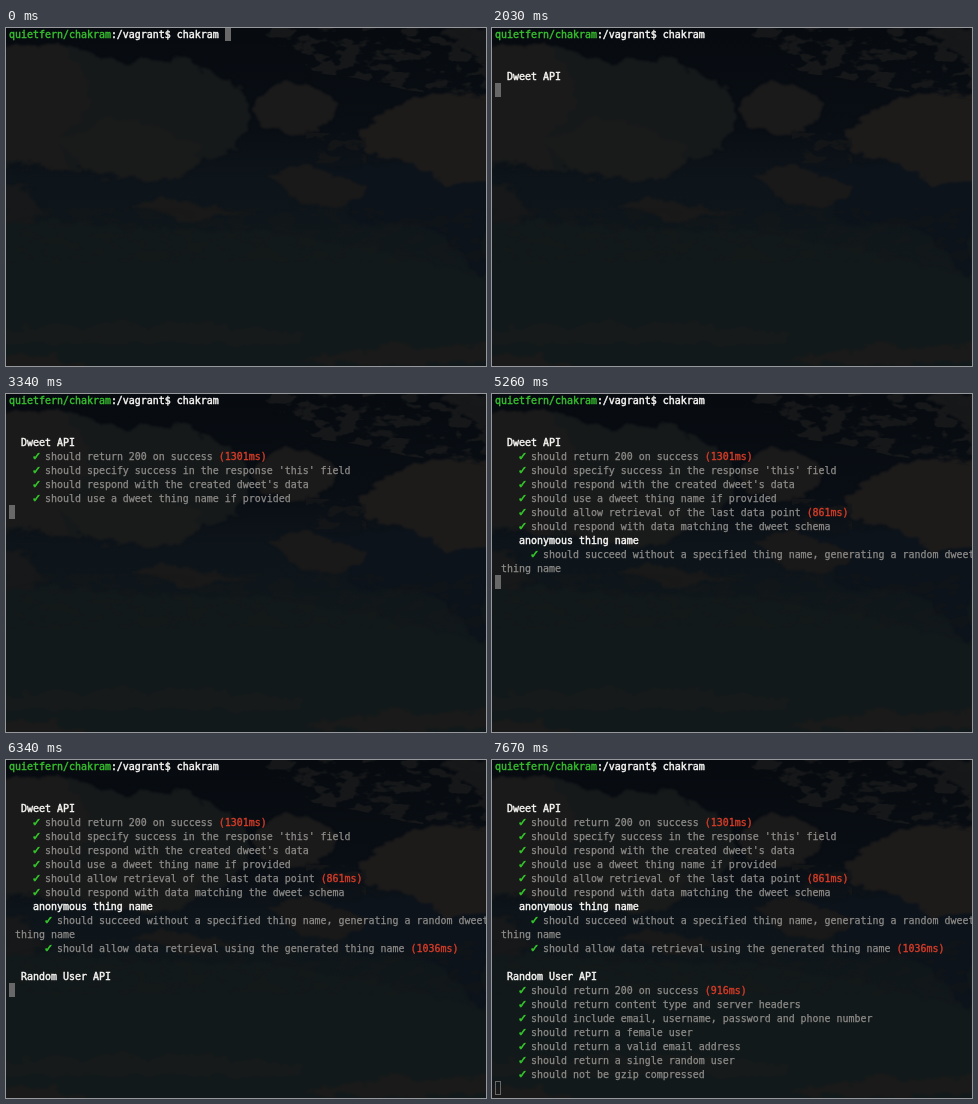
Recreate the animation shown at these times as an HTML page. Size 480x338 px, loop 7740 ms.

```html
<!DOCTYPE html>
<html lang="en">
<head>
<meta charset="utf-8">
<title>Test run in a terminal</title>
<style>
html, body { margin: 0; width: 100%; height: 100%; overflow: hidden; background: #10171b; }
svg, pre, #cursor { position: absolute; }
svg { left: 0; top: 0; }
pre {
  left: 3px; top: 0; margin: 0; color: #8e8c89;
  font: 9.967px/14px "DejaVu Sans Mono", monospace;
  -webkit-text-stroke: .25px;
}
pre div { height: 14px; }
.white { color: #f8f7f4; -webkit-text-stroke: .45px; }
.green { color: #37c22e; -webkit-text-stroke: .4px; }
.red { color: #d83c28; -webkit-text-stroke: .35px; }
.tick {
  position: absolute; margin-left: -1px; color: #35c92c;
  font: bold 11px/14px "DejaVu Sans", sans-serif; -webkit-text-stroke: .6px;
}
#cursor { box-sizing: border-box; width: 6px; height: 14px; border: 1px solid #686868; }
</style>
</head>
<body>
<svg width="480" height="338" viewBox="0 0 480 338">
  <defs>
    <linearGradient id="sky" x2="0" y2="1">
      <stop offset="0" stop-color="#070b10"/>
      <stop offset=".3" stop-color="#090e14"/>
      <stop offset=".45" stop-color="#0d141a"/>
      <stop offset=".62" stop-color="#10171b"/>
      <stop offset="1" stop-color="#14191b"/>
    </linearGradient>
    <filter id="rough" x="-20%" y="-20%" width="140%" height="140%" color-interpolation-filters="sRGB">
      <feTurbulence type="fractalNoise" baseFrequency=".045 .08" numOctaves="4" seed="4"/>
      <feDisplacementMap in="SourceGraphic" scale="18" xChannelSelector="R" yChannelSelector="G"/>
      <feGaussianBlur stdDeviation=".8"/>
    </filter>
    <filter id="flecks" color-interpolation-filters="sRGB">
      <feTurbulence type="fractalNoise" baseFrequency=".045 .09" numOctaves="3" seed="9"/>
      <feColorMatrix values="0 0 0 0 .085  0 0 0 0 .09  0 0 0 0 .095  10 0 0 0 -5"/>
      <feComposite in2="SourceGraphic" operator="in"/>
    </filter>
  </defs>
  <rect width="480" height="338" fill="url(#sky)"/>
  <g filter="url(#rough)">
    <path d="M300 142 480 130V255L430 200 350 192Z" fill="#0c131a"/>
    <path d="M-20 190 140 200 260 205 350 215 500 255V350H-20Z" fill="#12191b"/>
    <path d="M-20 20 60 18 120 35 175 32 235 60 246 90 228 122 195 130 175 150 100 148 50 136-20 140Z" fill="#16191a"/>
    <path d="M-20 20 50 15 72 38 85 70 55 112 60 140-20 132Z" fill="#1b1a1a"/>
    <path d="M55 112 100 92 150 97 192 120 196 138 160 153 80 146Z" fill="#191a1a"/>
    <path d="M252 68 275 52 305 56 332 75 325 96 290 107 260 98 250 82Z" fill="#1b1a1a"/>
    <path d="M354 103 390 76 430 66 500 66V152L440 158 415 138 362 126Z" fill="#1d1b1a"/>
    <path d="M260 146 290 138 340 150 362 163 330 181 290 172Z" fill="#1a1919"/>
    <path d="M126 180 165 169 205 179 245 185 190 193Z" fill="#191919"/>
    <path d="M-20 152 20 160 42 185 15 196-20 190Z" fill="#161819"/>
    <path d="M-20 300 180 296 300 306 290 316-20 314Z" fill="#171a1a"/>
    <path d="M-20 330 50 326 85 345H-20ZM290 332 400 316 500 320V334L360 338Z" fill="#191a19"/>
    <path d="M435 0H500V32L462 24Z" fill="#171819"/>
  </g>
  <g filter="url(#flecks)">
    <path d="M250 0H480V72L400 62 350 50 310 45Z"/>
    <path d="M0 180H480V235H0Z" opacity=".3"/>
    <path d="M300 105H360V135H300Z" opacity=".8"/>
  </g>
</svg>
<pre id="screen"></pre>
<div id="cursor"></div>
<script>
const LOOP = 7740, HOLLOW = 7670;
// Each step prints its text at the given time; the cursor waits after it.
const steps = [
  [0, "quietfern/chakram:/vagrant$ chakram "],
  [1550, "\n"],
  [2030, "\n\n  Dweet API\n"],
  [3340, `    ✓ should return 200 on success (1301ms)
    ✓ should specify success in the response 'this' field
    ✓ should respond with the created dweet's data
    ✓ should use a dweet thing name if provided
`],
  [4300, `    ✓ should allow retrieval of the last data point (861ms)
    ✓ should respond with data matching the dweet schema
    anonymous thing name
`],
  [5260, `      ✓ should succeed without a specified thing name, generating a random dweet
 thing name
`],
  [6340, `      ✓ should allow data retrieval using the generated thing name (1036ms)

  Random User API
`],
  [7300, `    ✓ should return 200 on success (916ms)
    ✓ should return content type and server headers
    ✓ should include email, username, password and phone number
    ✓ should return a female user
    ✓ should return a valid email address
    ✓ should return a single random user
    ✓ should not be gzip compressed
`]
];
const screen = document.getElementById("screen");
const cursor = document.getElementById("cursor");
const span = (name, text) => `<span class="${name}">${text}</span>`;

function format(line) {
  if (line.includes("$")) {
    const [path, rest] = line.split(":");
    return span("green", path) + span("white", ":" + rest);
  }
  if (/API|anonymous/.test(line)) return span("white", line);
  return line
    .replace(/\(\d+ms\)/, time => span("red", time))
    .replace("✓", span("tick", "✓") + " ");
}

let shown = 0;
function draw(now) {
  const t = now % LOOP;
  const count = steps.filter(([start]) => start <= t).length;
  if (count !== shown) {
    shown = count;
    const lines = steps.slice(0, count).map(step => step[1]).join("").split("\n");
    screen.innerHTML = lines.map(line => `<div>${format(line)}</div>`).join("");
    const row = lines.length - 1;
    cursor.style.left = 3 + 6 * lines[row].length + "px";
    cursor.style.top = 14 * row - 1 + "px";
  }
  cursor.style.background = t < HOLLOW ? "#686868" : "none";
}

const begin = performance.now();
function tick() {
  draw(performance.now() - begin);
  requestAnimationFrame(tick);
}
tick();
</script>
</body>
</html>
```
